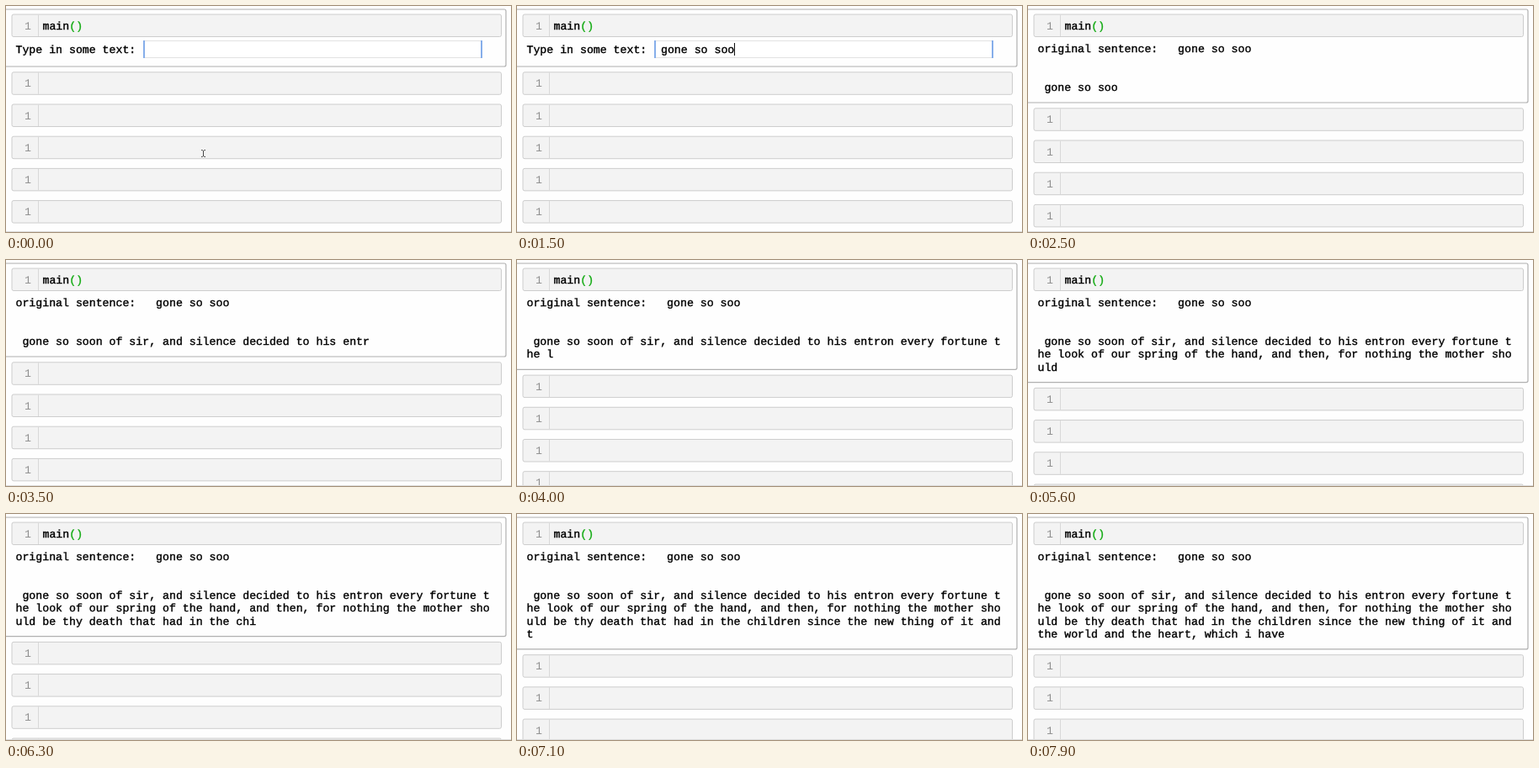
Recreate the animation shown at these times as an HTML page. Size 600x269 px, loop 8 s.

```html
<!DOCTYPE html>
<html lang="en">
<head>
<meta charset="utf-8">
<title>Notebook text generator</title>
<style>
  html, body { margin: 0; width: 100%; height: 100%; overflow: hidden; background: #fefefe; }
  svg { display: block; width: 600px; height: 269px; }
  text {
    font: 13.23px "Liberation Mono", "Courier New", monospace;
    text-rendering: geometricPrecision;
    white-space: pre;
    fill: #000;
    stroke: #000;
    stroke-width: .38px;
  }
  .paren { fill: #12ab12; stroke: #12ab12; }
  .count { fill: #8f8f8f; stroke: none; }
  .area { fill: #f3f3f3; stroke: #cdcdcd; }
  .gutter { stroke: #d8d8d8; }
  .frame { fill: none; stroke: #b0b0b0; stroke-width: 1.2; }
  .field { fill: #fff; stroke: #e2e2e2; }
  .focus { fill: #86aeea; }
  .pointer { fill: none; stroke: #444; stroke-width: 1; }
</style>
</head>
<body>
<svg viewBox="0 0 600 269">
  <defs>
    <g id="cell">
      <rect class="area" x="7" y=".5" width="581.5" height="26.5" rx="2"/>
      <path class="gutter" d="M38.5 1V26.5"/>
      <text class="count" x="22" y="18">1</text>
    </g>
  </defs>

  <rect id="frame" class="frame" x="-6" y="4" width="600" height="68" rx="2"/>
  <use href="#cell" y="9.5"/>
  <text x="43.5" y="27.5">main<tspan class="paren">()</tspan></text>

  <g id="prompt">
    <text x="11.5" y="56">Type in some text:</text>
    <rect class="field" x="163.5" y="41.5" width="402" height="20"/>
    <rect class="focus" x="163" y="41" width="2" height="21"/>
    <rect class="focus" x="564" y="41" width="2" height="21"/>
    <text id="typed" x="171" y="56"></text>
    <rect id="caret" y="44" width="1" height="15"/>
  </g>

  <g id="output">
    <text x="11.5" y="55">original sentence:   gone so soo</text>
    <g id="lines"></g>
  </g>

  <g id="cells"></g>
  <path d="M0 268.5H600" stroke="#dedede"/>
  <path id="pointer" class="pointer" d="M232 171.5Q234 171.5 234.5 172.5Q235 171.5 237 171.5M234.5 172.5V179M232 179.5Q234 179.5 234.5 178.5Q235 179.5 237 179.5"/>
</svg>

<script>
const LOOP = 8000, STEP = 100, PITCH = 7.938, LINE = 15.3;
const INPUT = "gone so soo";
const KEYS = [100, 200, 300, 400, 600, 700, 900, 1000, 1200, 1300, 1500];
const ROWS = [
  " gone so soon of sir, and silence decided to his entron every fortune t",
  "he look of our spring of the hand, and then, for nothing the mother sho",
  "uld be thy death that had in the children since the new thing of it and ",
  "the world and the heart, which i have"
];
// [time, characters written so far]
const PACE = [
  [2600, 12], [3500, 53], [4400, 93], [4900, 114], [5300, 133],
  [6200, 174], [6300, 178], [7100, 215], [7900, 251]
];

const $ = id => document.getElementById(id);
const show = (el, on) => el.setAttribute("visibility", on ? "visible" : "hidden");

function add(parent, tag, attrs) {
  const el = document.createElementNS("http://www.w3.org/2000/svg", tag);
  for (const key in attrs) el.setAttribute(key, attrs[key]);
  return parent.appendChild(el);
}

const rowEls = ROWS.map((_, i) => add($("lines"), "text", { x: 11.5, y: 101 + i * LINE }));
for (let i = 0; i < 6; i++) add($("cells"), "use", { href: "#cell", y: i * 38.2 });

function written(t) {
  if (t <= PACE[0][0]) return PACE[0][1];
  const i = PACE.findIndex(p => t <= p[0]);
  const [t0, n0] = PACE[i - 1], [t1, n1] = PACE[i];
  return Math.floor(n0 + (n1 - n0) * (t - t0) / (t1 - t0) + 1e-6);
}

function draw(t) {
  const asking = t < 2000, printing = t >= 2500;
  let bottom = asking ? 72 : 41.7;

  show($("prompt"), asking);
  show($("output"), printing);
  show($("pointer"), t < KEYS[0]);

  const keys = KEYS.filter(k => k <= t).length;
  $("typed").textContent = INPUT.slice(0, keys);
  $("caret").setAttribute("x", 170.6 + keys * PITCH);
  show($("caret"), asking && keys > 0);

  if (printing) {
    let left = written(t), used = 0;
    ROWS.forEach((row, i) => {
      rowEls[i].textContent = row.slice(0, Math.max(0, left));
      if (left > 0) used++;
      left -= row.length;
    });
    bottom = 115 + (used - 1) * LINE;
  }

  $("frame").setAttribute("height", bottom - 4);
  $("cells").setAttribute("transform", `translate(0 ${bottom + 6.3})`);
}

let last = -1;
function tick() {
  const t = Math.floor(performance.now() % LOOP / STEP) * STEP;
  if (t !== last) draw(last = t);
  requestAnimationFrame(tick);
}
tick();
</script>
</body>
</html>
```
